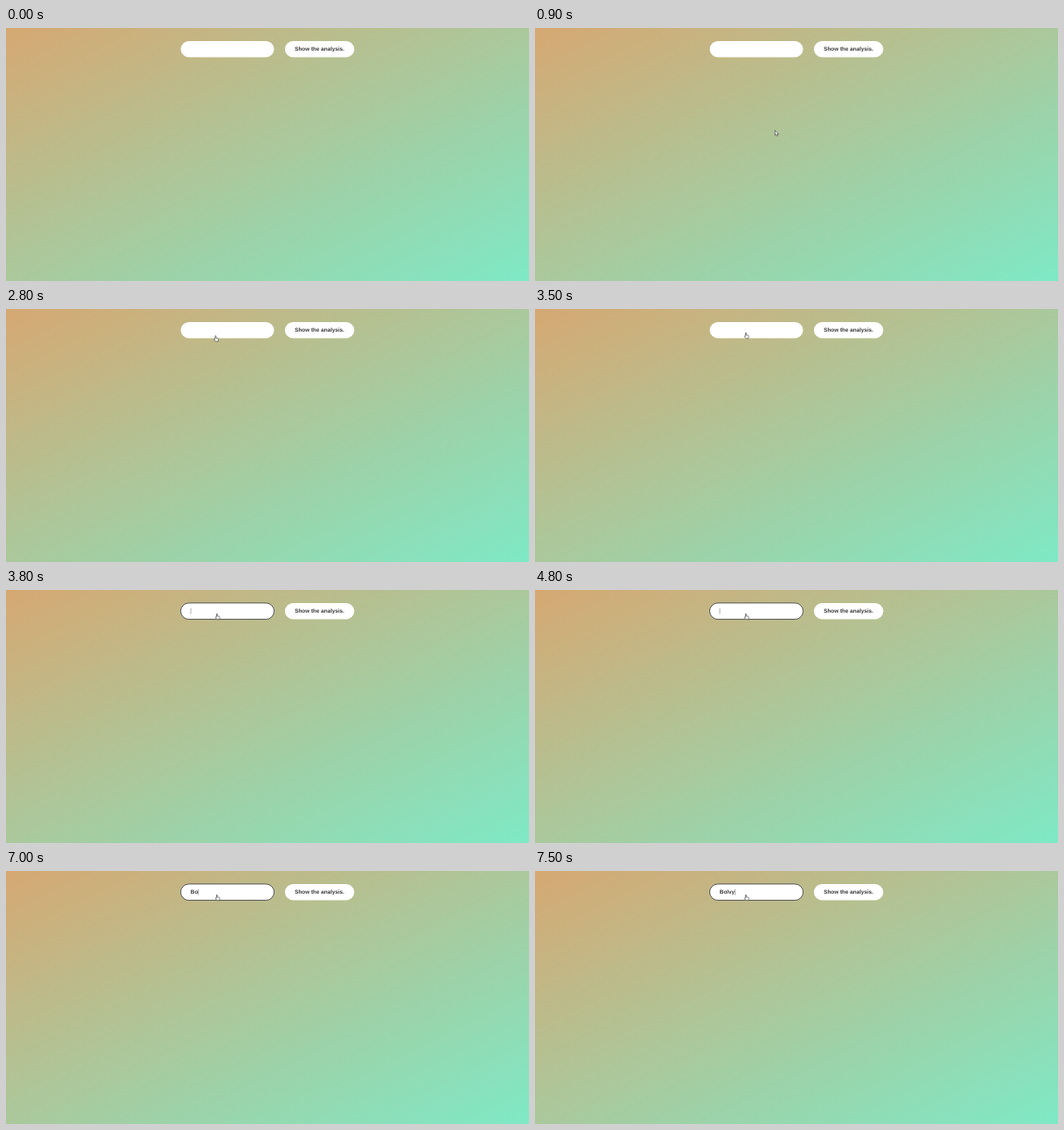
Animation, 600 px wide and 290 px high, one loop 8 s. Source, as an HTML page:

```html
<!DOCTYPE html>
<html lang="en">
<head>
<meta charset="utf-8">
<title>Name analysis</title>
<style>
  html, body { margin: 0; width: 100%; height: 100%; overflow: hidden; }
  body { background: linear-gradient(to bottom right, #d6a872, #7ee9c6); }
  svg { display: block; width: 600px; height: 290px; }
  text {
    font: bold 6.37px "Liberation Sans", Arial, sans-serif;
    fill: #3a3a3a;
    text-rendering: geometricPrecision;
  }
  .pointer { fill: #fff; stroke: #3c3c3c; stroke-width: .65; stroke-linejoin: round; }
</style>
</head>
<body>
<svg viewBox="0 0 600 290">
  <rect x="200.5" y="15" width="107" height="18.5" rx="9.25" fill="#fff"/>
  <g id="ring" fill="none">
    <rect x="199.9" y="14.4" width="108.2" height="19.7" rx="9.85" stroke="#fff" stroke-opacity=".6" stroke-width=".4"/>
    <rect x="200.4" y="14.9" width="107.2" height="18.7" rx="9.35" stroke="#2a2a2a" stroke-width=".8"/>
  </g>
  <text id="typed" x="211.8" y="26.3"></text>
  <rect id="caret" y="20.9" width=".6" height="6.8" fill="#777"/>

  <rect x="320" y="15" width="79.5" height="18.5" rx="9.25" fill="#fff"/>
  <text x="331.2" y="26.3">Show the analysis.</text>

  <path id="arrow" class="pointer" d="M.4 .4V6L1.7 4.9 2.6 6.8 3.6 6.4 2.8 4.5H4.4Z"/>
  <path id="hand" class="pointer" d="M1.7 4.4V1Q1.7 .4 2.2 .4T2.7 1V3L5 3.5Q5.6 3.7 5.5 4.5L5 7H2.4L.6 4.9Q.5 4.1 1.1 4.1Z"/>
</svg>
<script>
const LOOP = 8000;
const NAME = "Bolvy";
const [ring, typed, caret, arrow, hand] =
  ["ring", "typed", "caret", "arrow", "hand"].map(id => document.getElementById(id));

// [start ms, x, y, shape]
const moves = [
  [300, 572, 0, arrow], [400, 546, 88, arrow], [500, 492, 176, arrow],
  [600, 424, 216, arrow], [700, 356, 200, arrow], [800, 308, 160, arrow],
  [900, 275, 117, arrow], [1000, 266, 80, arrow], [1100, 261, 56, arrow],
  [1200, 252, 50, arrow], [1300, 245, 46.5, arrow], [1400, 240, 37, arrow],
  [1500, 238.2, 30.2, hand], [3400, 239, 28, hand], [3500, 239.7, 26.8, hand]
];
const FOCUS = 3800;
const blinks = [3800, 4300, 4800, 5300, 5900, 6400, 6900];
const keys = [6900, 7000, 7100, 7300, 7500];

const passed = (times, t) => times.filter(start => start <= t).length;
const show = (node, on) => node.setAttribute("visibility", on ? "visible" : "hidden");

function render(t) {
  const move = moves[passed(moves.map(m => m[0]), t) - 1];
  for (const shape of [arrow, hand]) show(shape, move && move[3] === shape);
  if (move) move[3].setAttribute("transform", `translate(${move[1]} ${move[2]})`);

  show(ring, t >= FOCUS);
  show(caret, passed(blinks, t) % 2 === 1);
  typed.textContent = NAME.slice(0, passed(keys, t));
  const width = typed.textContent ? typed.getComputedTextLength() : 0;
  caret.setAttribute("x", 211.7 + width);
}

const start = performance.now();
function tick() {
  render((performance.now() - start) % LOOP);
  requestAnimationFrame(tick);
}
tick();
</script>
</body>
</html>
```
